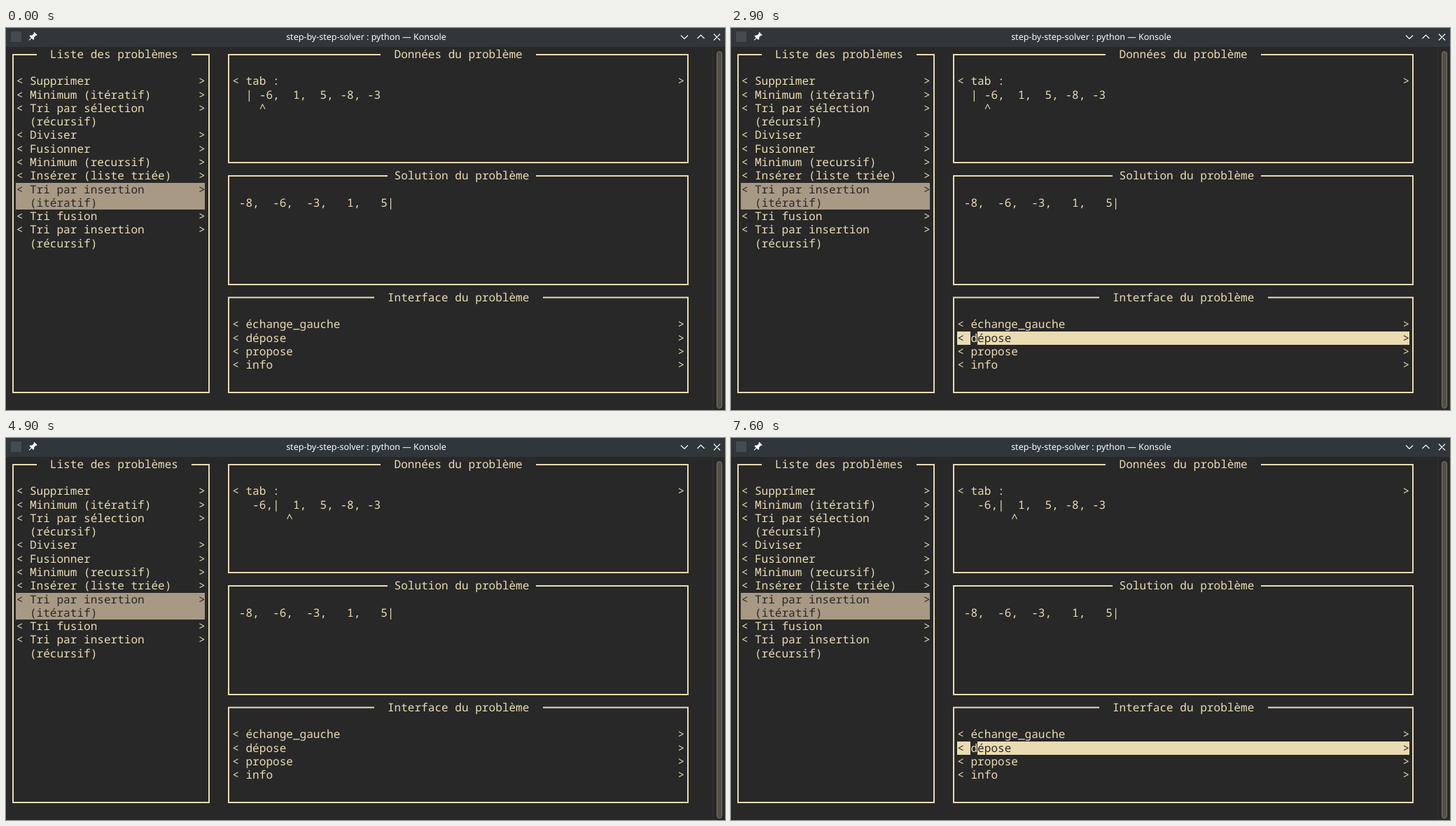
These frames come from a looping animation (1027x545 px, 8000 ms). An HTML page:

```html
<!DOCTYPE html>
<html lang="fr">
<head>
<meta charset="utf-8">
<title>step-by-step-solver</title>
<style>
  html, body { margin: 0; width: 100%; height: 100%; overflow: hidden; background: #282828; }
  svg { display: block; }
  text { white-space: pre; text-rendering: geometricPrecision; }
  .term text { font: 16.07px "Noto Sans Mono", "DejaVu Sans Mono", monospace; font-variant-ligatures: none; }
  .title { font: 12.5px "Noto Sans", sans-serif; fill: #fcfcfc; text-anchor: middle; }
  .state { visibility: hidden; animation: 8s step-end infinite; }
  .first { animation-name: first; }
  .second { animation-name: second; }
  .dimmed { animation-name: dimmed; }
  .picked { animation-name: dimmed; }
  .moved { animation-name: moved; }
  @keyframes first {
    0%, 36.25%, 95% { visibility: hidden; }
    16.25%, 91.25% { visibility: visible; }
  }
  @keyframes second {
    0%, 53.75% { visibility: hidden; }
    36.25%, 95%, 100% { visibility: visible; }
  }
  @keyframes dimmed {
    0%, 61.25% { visibility: hidden; }
    53.75% { visibility: visible; }
  }
  @keyframes moved {
    0% { visibility: hidden; }
    61.25%, 100% { visibility: visible; }
  }
</style>
</head>
<body>
<svg width="1027" height="545" viewBox="0 0 1027 545">
  <rect width="1027" height="545" fill="#282828"/>
  <rect width="1027" height="27" fill="#31363b"/>
  <rect x="7" y="5" width="15" height="15" fill="#454b50"/>
  <g transform="translate(38 12.5) rotate(45)" fill="#fcfcfc">
    <path d="M-3-6.5h6v1.5h-1v4l2 2v1.5h-8v-1.5l2-2v-4h-1z"/>
    <path d="M-.6 2h1.2v5h-1.2z"/>
  </g>
  <text class="title" x="514.5" y="17">step-by-step-solver : python — Konsole</text>
  <path d="M964 10.5l5 5 5-5M987.500 15l5-5 5 5M1011 8.500l9 9m0-9l-9 9" fill="none" stroke="#fcfcfc" stroke-width="1.2"/>
  <path d="M1009.500 28V545" stroke="#30302f"/>
  <rect x="1015.500" y="33.500" width="7" height="509" rx="3.500" fill="#544f45" stroke="#7b7363"/>
  <g class="term" id="term"></g>
</svg>
<script>
  const LIGHT = '#ebdbb2', DIM = '#a89984', DARK = '#282828';
  const CELL_W = 9.642, CELL_H = 19.28;
  const term = document.getElementById('term');
  const colX = col => 5 + col * CELL_W;
  const rowY = row => 28 + row * CELL_H;

  function add(parent, tag, attrs, content = '') {
    const node = document.createElementNS('http://www.w3.org/2000/svg', tag);
    for (const key in attrs) node.setAttribute(key, attrs[key]);
    node.textContent = content;
    return parent.appendChild(node);
  }

  const state = name => add(term, 'g', { class: 'state ' + name });

  function write(parent, col, row, content, fill = LIGHT) {
    add(parent, 'text', { x: colX(col), y: Math.round(rowY(row) + 14.7), fill }, content);
  }

  function fillCells(parent, col, row, cols, rows, fill) {
    const x = Math.round(colX(col) - 0.2), y = Math.round(rowY(row));
    const width = Math.round(colX(col + cols) - 0.2) - x;
    const height = Math.round(rowY(row + rows)) - y;
    add(parent, 'rect', { x, y, width, height, fill });
  }

  function panel(left, top, right, bottom, gapStart, gapEnd, titleCol, row, title) {
    const d = `M${Math.round(colX(gapStart))} ${top}H${left}V${bottom}H${right}V${top}H${Math.round(colX(gapEnd))}`;
    add(term, 'path', { d, fill: 'none', stroke: LIGHT, 'stroke-width': 2 });
    write(term, titleCol, row, title);
  }

  // A button is one or more lines between angle brackets.
  function button(parent, col, endCol, row, lines, fill) {
    write(parent, col, row, '<', fill);
    write(parent, endCol, row, '>', fill);
    lines.forEach((line, i) => write(parent, col + 2, row + i, line, fill));
  }

  function highlight(parent, col, endCol, row, lines, back, cursor) {
    fillCells(parent, col, row, endCol - col + 1, lines.length, back);
    button(parent, col, endCol, row, lines, DARK);
    if (cursor) {
      fillCells(parent, col + 2, row, 1, 1, DARK);
      write(parent, col + 2, row, lines[0][0]);
    }
  }

  panel(10, 38, 290, 520, 4, 27, 6, 0, 'Liste des problèmes');
  panel(318, 38, 974, 192, 55, 78, 57, 0, 'Données du problème');
  panel(318, 211, 974, 366, 56, 78, 57, 9, 'Solution du problème');
  panel(318, 384.5, 974, 520, 54, 79, 56, 18, 'Interface du problème');

  const problems = [
    ['Supprimer'], ['Minimum (itératif)'], ['Tri par sélection', '(récursif)'],
    ['Diviser'], ['Fusionner'], ['Minimum (recursif)'], ['Insérer (liste triée)'],
    ['Tri par insertion', '(itératif)'], ['Tri fusion'], ['Tri par insertion', '(récursif)']
  ];
  let row = 2;
  problems.forEach((lines, i) => {
    if (i === 7) highlight(term, 1, 28, row, lines, DIM);
    else button(term, 1, 28, row, lines);
    row += lines.length;
  });

  const before = ['tab :', '| -6,  1,  5, -8, -3', '  ^'];
  const after = ['tab :', ' -6,|  1,  5, -8, -3', '      ^'];
  button(term, 33, 99, 2, before);
  highlight(state('picked'), 33, 99, 2, before, LIGHT, true);
  const moved = state('moved');
  fillCells(moved, 33, 2, 67, 3, DARK);
  button(moved, 33, 99, 2, after);

  write(term, 34, 11, '-8,  -6,  -3,   1,   5|');

  const actions = ['échange_gauche', 'dépose', 'propose', 'info'];
  actions.forEach((name, i) => button(term, 33, 99, 20 + i, [name]));
  highlight(state('first'), 33, 99, 20, [actions[0]], LIGHT, true);
  highlight(state('second'), 33, 99, 21, [actions[1]], LIGHT, true);
  highlight(state('dimmed'), 33, 99, 21, [actions[1]], DIM);
</script>
</body>
</html>
```
